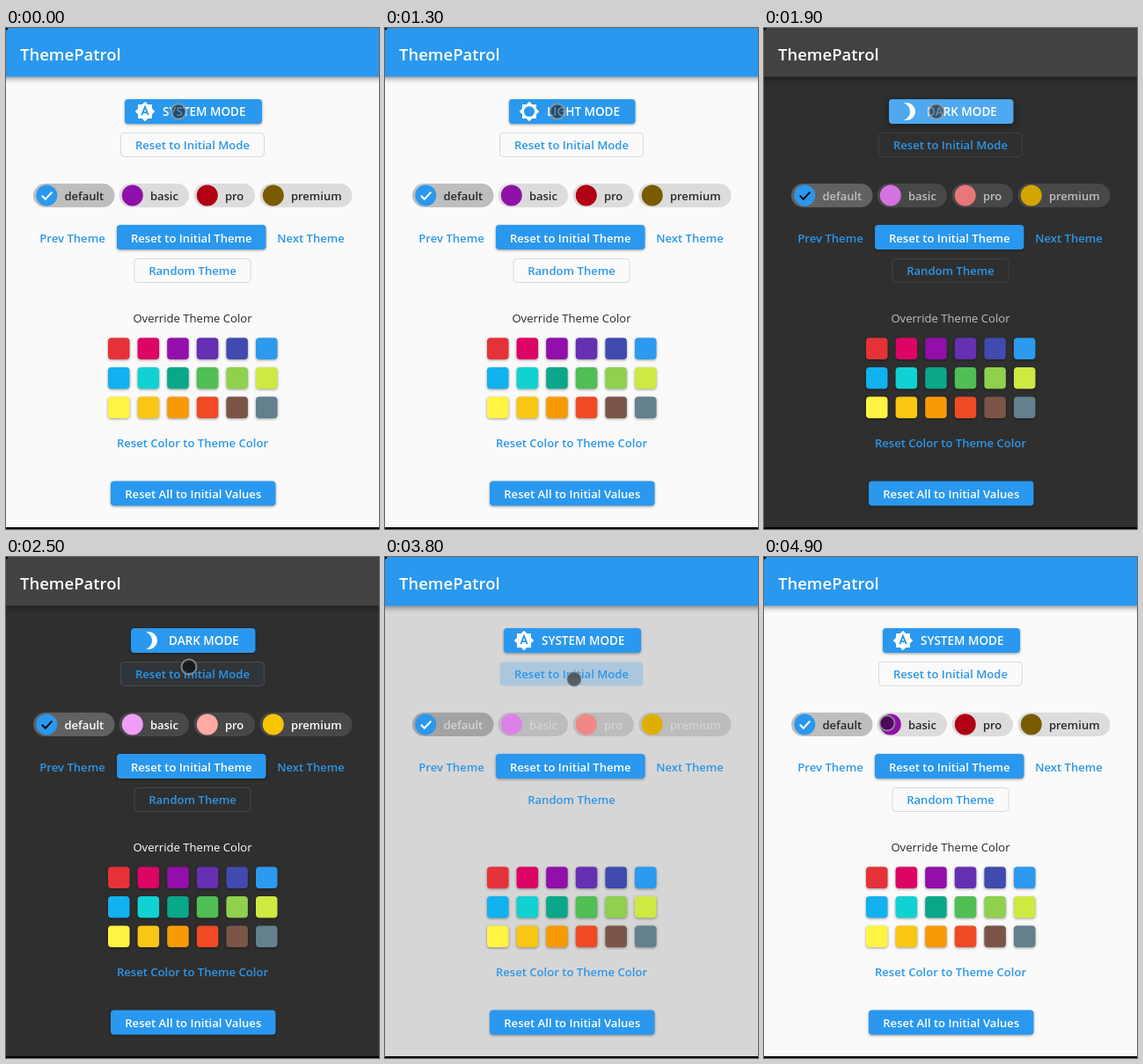
Recreate the animation shown at these times as an HTML page. Size 424x570 px, loop 5 s.

```html
<!DOCTYPE html>
<html lang="en">
<head>
<meta charset="utf-8">
<title>ThemePatrol</title>
<style>
  html, body { margin: 0; width: 100%; height: 100%; overflow: hidden; }
  svg { display: block; width: 424px; height: 570px; font: 600 13.1px "Open Sans", "Noto Sans", sans-serif; }
  .raised { filter: drop-shadow(0 1.5px 1.5px rgba(0, 0, 0, .38)); }
  .pressed { filter: drop-shadow(0 3px 4px rgba(0, 0, 0, .42)); }
  .bar { filter: drop-shadow(0 2px 3px rgba(0, 0, 0, .42)); }
</style>
</head>
<body>
<svg id="stage" viewBox="0 0 424 570"></svg>
<script>
const stage = document.getElementById('stage');
const LOOP = 5000, STEP = 100;
const BLUE = '#2a98ee', LINK = '#2d96e8';

const STAR = 'M20 8.69V4h-4.69L12 .69 8.69 4H4v4.69L.69 12 4 15.31V20h4.69L12 23.31 15.31 20H20v-4.69L23.31 12z';
const MOON = 'M9 2c-1.05 0-2.05.16-3 .46 4.06 1.27 7 5.06 7 9.54s-2.94 8.27-7 9.54c.95.3 1.95.46 3 .46 5.52 0 10-4.48 10-10S14.52 2 9 2z';
const star = `<path d="${STAR}" fill="#fff"/>`;
const MODES = {
  system: { label: 'SYSTEM MODE', x: 135, w: 156, icon: star +
    `<path d="M8.3 16.2 12 6.8l3.7 9.4M9.7 13.2h4.6" fill="none" stroke="${BLUE}" stroke-width="1.8"/>` },
  light: { label: 'LIGHT MODE', x: 141, w: 143.5, icon: star + `<circle cx="12" cy="12" r="6" fill="${BLUE}"/>` },
  dark: { label: 'DARK MODE', x: 142, w: 141.5, icon: `<path d="${MOON}" fill="#fff"/>` }
};
const CHIPS = [
  ['default', 31, 92.5, BLUE, BLUE],
  ['basic', 128.5, 79.5, '#8e10a8', '#f09df8'],
  ['pro', 213.5, 69.5, '#b00012', '#ffaaa4'],
  ['premium', 288.5, 105, '#7a5c00', '#f8c400']
];
const SWATCHES = [
  '#e53238 #dc0565 #930fab #6630b2 #414aae #2c9aee',
  '#12b1ef #12d1d2 #0aa78a #50bf55 #8fd04f #cfe942',
  '#fff344 #f9c613 #f89a06 #f04a25 #7a5548 #64808c'
].map(row => row.split(' '));
const TAPS = [
  { x: 196, y: 95, at: 450, on: 'mode' },
  { x: 196, y: 95, at: 1550, on: 'mode' },
  { x: 215, y: 137, at: 3500, on: 'reset' }
];
// time, x, y of the pointer
const PATH = [[0, 196, 95], [2200, 196, 95], [2500, 208, 125], [2700, 208, 125],
  [3000, 215, 139], [4300, 215, 139], [4800, 140, 189], [5000, 140, 189]];

const ramp = (t, a, b) => Math.min(1, Math.max(0, (t - a) / (b - a)));
const ease = k => k * k * (3 - 2 * k);
const lerp = (a, b, k) => a + (b - a) * k;
const channels = hex => [1, 3, 5].map(i => parseInt(hex.slice(i, i + 2), 16));
const mix = (a, b, k) => {
  const end = channels(b);
  return `rgb(${channels(a).map((v, i) => Math.round(lerp(v, end[i], k)))})`;
};

const rect = (x, y, w, h, r, fill, attrs = '') =>
  `<rect x="${x}" y="${y}" width="${w}" height="${h}" rx="${r}" fill="${fill}" ${attrs}/>`;
const text = (label, x, y, fill, attrs = 'text-anchor="middle"') =>
  `<text x="${x}" y="${y}" fill="${fill}" ${attrs}>${label}</text>`;
const filled = (label, x, y, w) =>
  rect(x, y, w, 28, 4, BLUE, 'class="raised"') + text(label, x + w / 2, y + 19.5, '#fff');
const outlined = (label, x, y, w, border) =>
  rect(x, y, w, 27, 4, 'none', `stroke="${border}" stroke-opacity=".13"`) + text(label, x + w / 2, y + 18.5, LINK);

function pointerAt(t) {
  const i = PATH.findIndex(p => p[0] > t);
  const [a, b] = [PATH[i - 1], PATH[i]];
  const k = ease(ramp(t, a[0], b[0]));
  return [lerp(a[1], b[1], k), lerp(a[2], b[2], k)];
}

function ripple(t, on) {
  const tap = TAPS.find(p => p.on === on && t > p.at && t < p.at + 600);
  if (!tap) return '';
  const age = t - tap.at;
  const opacity = .2 * (1 - ramp(age, 300, 600));
  return `<circle cx="${tap.x}" cy="${tap.y}" r="${age * .3}" fill="${on === 'mode' ? '#fff' : BLUE}"
    fill-opacity="${opacity}" clip-path="url(#${on})"/>`;
}

function modeButton(t) {
  const mode = MODES[t >= 600 && t < 1700 ? 'light' : t >= 1700 && t < 3700 ? 'dark' : 'system'];
  const wave = ripple(t, 'mode');
  return `<clipPath id="mode">${rect(mode.x, 81, mode.w, 28, 4, '#000')}</clipPath>` +
    rect(mode.x, 81, mode.w, 28, 4, BLUE, `class="${wave ? 'pressed' : 'raised'}"`) + wave +
    `<g transform="translate(${mode.x + 11} 83)">${mode.icon}</g>` +
    text(mode.label, mode.x + 43, 100, '#fff', 'font-size="13.5"');
}

function chip([label, x, w, light, dark], i, isDark, late) {
  const cx = x + 15.3;
  const check = i ? '' : `<path d="M${cx - 5.5} 190.8l4 4 7.5-8" fill="none" stroke="${isDark ? '#111' : '#fff'}" stroke-width="2"/>`;
  return rect(x, 177, w, 27, 13.5, isDark ? '#fff' : '#000', `fill-opacity="${i ? .12 : .24}"`) +
    `<circle cx="${cx}" cy="190.5" r="12" fill="${mix(light, dark, late)}"/>` + check +
    text(label, x + 35.4, 195.5, mix('#282828', '#ffffff', late), 'font-size="13"');
}

function cursor(t) {
  const [x, y] = pointerAt(t);
  const down = TAPS.some(p => t > p.at + 100 && t < p.at + 350);
  return `<circle cx="${x}" cy="${y}" r="8.5" stroke-width="2" ` + (down
    ? 'fill="#464b50" fill-opacity=".85" stroke="#bbb" stroke-opacity=".5"/>'
    : 'fill="#000" fill-opacity=".48" stroke="#a0a0a0" stroke-opacity=".75"/>');
}

function draw(t) {
  // the page fades first; text, borders and avatars follow once brightness flips
  const fade = ramp(t, 1667, 1867) - ramp(t, 3635, 3835);
  const late = ramp(t, 1760, 1960) - ramp(t, 3760, 3960);
  const isDark = t >= 1800 && t < 3800;
  const border = mix('#000000', '#ffffff', late);
  const hover = t >= 2500 && t < 4500 ? .05 : 0;

  stage.innerHTML =
    rect(0, 0, 424, 570, 0, mix('#fafafa', '#2f2f2f', fade)) +
    rect(-6, -6, 436, 61.5, 0, isDark ? '#424242' : BLUE, 'class="bar"') +
    text('ThemePatrol', 16, 36.5, '#fff', 'font-size="18.5"') +
    modeButton(t) +
    `<clipPath id="reset">${rect(130.5, 119.5, 163, 27, 4, '#000')}</clipPath>` +
    rect(130.5, 119.5, 163, 27, 4, BLUE, `fill-opacity="${hover}"`) +
    ripple(t, 'reset') +
    outlined('Reset to Initial Mode', 130.5, 119.5, 163, border) +
    CHIPS.map((c, i) => chip(c, i, isDark, late)).join('') +
    text('Prev Theme', 75.5, 243.5, LINK) +
    filled('Reset to Initial Theme', 126, 224, 169.5) +
    text('Next Theme', 346.5, 243.5, LINK) +
    outlined('Random Theme', 146, 262.5, 132, border) +
    text('Override Theme Color', 212, 335, mix('#282828', '#ffffff', late), 'text-anchor="middle" font-weight="400"') +
    SWATCHES.map((row, j) => row.map((color, i) =>
      rect(116 + i * 33.6, 352.5 + j * 33.5, 24.5, 24.5, 4, color, 'class="raised"')).join('')).join('') +
    text('Reset Color to Theme Color', 212, 476.5, LINK) +
    filled('Reset All to Initial Values', 119, 515.5, 187.5) +
    cursor(t) +
    rect(0, 568, 424, 2, 0, '#000') +
    '<path d="M0 0h3L0 3z"/>';
}

const start = performance.now();
let shown = -1;
function frame() {
  const t = Math.floor((performance.now() - start) % LOOP / STEP) * STEP;
  if (t !== shown) draw(shown = t);
  requestAnimationFrame(frame);
}
frame();
</script>
</body>
</html>
```
